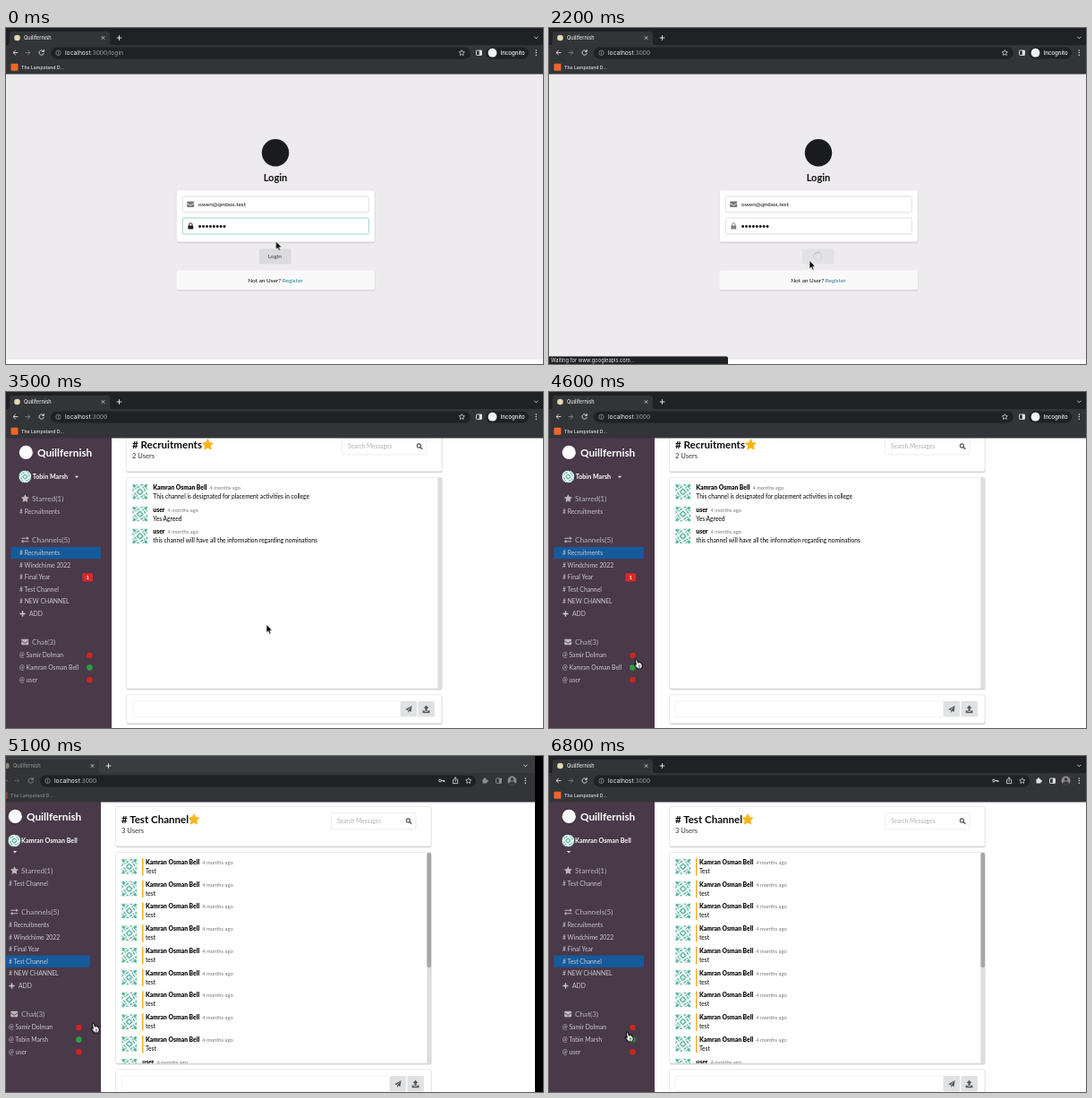
An HTML page that plays this animation: 600x375 px, repeating every 6900 ms.

```html
<!DOCTYPE html>
<html lang="en">
<head>
<meta charset="utf-8">
<title>Quillfernish</title>
<style>
html, body { margin: 0; width: 100%; height: 100%; overflow: hidden; background: #000; }
svg { display: block; width: 600px; height: 375px; font-family: Lato, sans-serif; }
text { white-space: pre; }
.ui { font-family: Inter, Roboto, sans-serif; }
.b { font-weight: 700; }
.h { font-weight: 900; }
.m { font-weight: 500; }
.line { fill: none; stroke-linecap: round; stroke-linejoin: round; }
.timed { animation: 6900ms step-end infinite; }
#first { animation: slide 6900ms step-end infinite; }
#second { animation: slide 6900ms step-end infinite; }
#pointer { animation: point 6900ms infinite steps(6); }
.spin { animation: spin 575ms linear infinite; transform-origin: 300.5px 255px; }
@keyframes spin { to { transform: rotate(360deg); } }
@keyframes slide {
  0% { transform: translateX(0); }
  68.115% { transform: translateX(62px); }
  69.565% { transform: translateX(257px); }
  71.014% { transform: translateX(462px); }
  72.463% { transform: translateX(574px); }
  73.913% { transform: translateX(622px); }
  75.362%, 100% { transform: translateX(634px); }
}
@keyframes point {
  0%, 1.449% { transform: translate(301.5px, 238px); }
  10.144%, 11.594% { transform: translate(300px, 251px); }
  20.289% { transform: translate(291px, 259.5px); }
  53.623% { transform: translate(291px, 259.5px); animation-timing-function: steps(4); }
  59.42%, 85.507% { transform: translate(97px, 298px); }
  94.202%, 100% { transform: translate(87px, 308px); }
}
</style>
</head>
<body>
<svg id="stage" viewBox="0 0 600 375" xmlns="http://www.w3.org/2000/svg"></svg>
<script>
const BRAND = 'Quillfernish';
const ME = 'Tobin Marsh';
const PEER = 'Kamran Osman Bell';
const THIRD = 'Samir Dolman';
const CHANNELS = ['Recruitments', 'Windchime 2022', 'Final Year', 'Test Channel', 'NEW CHANNEL'];
const LOOP = 6900;
const FOCUS = 5300; // the second window becomes active
let css = '';

// y is the middle of the capitals
const text = (x, y, s, size, fill = '#0d0d0d', cls = '', anchor = 'start') =>
  `<text x="${x}" y="${y + size * 0.36}" font-size="${size}" fill="${fill}" class="${cls}" text-anchor="${anchor}">${s}</text>`;
const rect = (x, y, w, h, fill, r = 0, extra = '') =>
  `<rect x="${x}" y="${y}" width="${w}" height="${h}" rx="${r}" fill="${fill}" ${extra}/>`;
const dot = (x, y, r, fill) => `<circle cx="${x}" cy="${y}" r="${r}" fill="${fill}"/>`;
const line = (d, color, w = 1) => `<path class="line" d="${d}" stroke="${color}" stroke-width="${w}"/>`;
const fill = (d, color) => `<path d="${d}" fill="${color}"/>`;
const at = (x, y, body) => `<g transform="translate(${x} ${y})">${body}</g>`;

// Visible only from a to b (ms)
function show(a, b, body) {
  const name = `on${a}to${b}`;
  const pct = t => Math.max(0, t / LOOP * 100 - 0.002) + '%';
  if (!css.includes(name)) {
    css += `@keyframes ${name}{0%{opacity:0}${pct(a)}{opacity:1}${b < LOOP ? pct(b) + '{opacity:0}' : ''}100%{opacity:${b < LOOP ? 0 : 1}}}`;
  }
  return `<g class="timed" style="animation-name:${name}">${body}</g>`;
}

function star(x, y, r, color, stroke = 'none', w = 0) {
  const pts = Array.from({ length: 10 }, (_, i) => {
    const a = i * Math.PI / 5, q = i % 2 ? r * 0.5 : r;
    return `${(x + q * Math.sin(a)).toFixed(2)},${(y - q * Math.cos(a)).toFixed(2)}`;
  });
  return `<polygon points="${pts.join(' ')}" fill="${color}" stroke="${stroke}" stroke-width="${w}" stroke-linejoin="round"/>`;
}

const mail = (x, y, c, bg) => at(x, y, rect(-4, -3.2, 8, 6.4, c, 0.8) + line('M-4 -1.2L0 1.4L4 -1.2', bg, 0.8));
const lock = (x, y, c) => at(x, y, rect(-2.9, -0.6, 5.8, 4, c, 0.6) + line('M-1.7 -.6V-1.8A1.7 1.7 0 0 1 1.7 -1.8V-.6', c, 1));
const lens = (x, y, c) => at(x, y, `<circle cx="-.6" cy="-.6" r="2.1" fill="none" stroke="${c}" stroke-width="1.1"/>` + line('M1.1 1.1L2.9 2.9', c, 1.3));
const swap = (x, y, c) => at(x, y, line('M-3.6 -1.6H3M-3 1.8H3.6', c, 1.1) +
  fill('M2 -3.6L4.4 -1.6L2 .4zM-2 -.2L-4.4 1.8L-2 3.8z', c));
const caret = (x, y, c) => fill(`M${x - 2} ${y - 1}h4l-2 2.2z`, c);
const avatar = (x, y, size) => `<use href="#tile" x="${x}" y="${y}" width="${size}" height="${size}"/>`;

const defs = `<defs>
  <symbol id="tile" viewBox="0 0 16 16">${rect(0, 0, 16, 16, '#f1f9f7')}${[0, 90, 180, 270].map(a =>
    `<path transform="rotate(${a} 8 8)" fill="#5fb5a2" d="M0 0h2l-2 2zM2 0l2 2-2 2-2-2zM4 0h2l-2 2zM6 2h2l-2 2h-2zM0 4l2 2-2 2zM2 4h2v2zM8 4l-4 4h2l2-2z"/>`).join('')}</symbol>
  <clipPath id="round"><circle cx="21.3" cy="94.5" r="7"/></clipPath>
  <clipPath id="list"><rect x="134" y="107" width="348" height="236"/></clipPath>
</defs>`;

function browser(guest) {
  const pale = '#dfe1e5', grey = '#9aa0a6';
  const strip = rect(0, 0, 603, 19, '#202124');
  const url = path => `<text class="ui" x="66" y="30" font-size="6.7" fill="#f1f3f4">localhost<tspan fill="${grey}">:3000${path}</tspan></text>`;
  const panel = (x, c) => `<rect x="${x - 3}" y="25" width="6" height="5.4" rx=".6" fill="none" stroke="${c}" stroke-width=".9"/>` + rect(x + 0.3, 25, 2.7, 5.4, c);
  const outline = x => star(x, 27.8, 3.2, 'none', pale, 0.75);
  // Parts that fade while the window is inactive
  const marks = line('M8.5 27.5h4.5M10.5 25.2L8 27.5L10.5 29.8', pale, 0.9) +
    line('M22 27.5h4.5M24.5 25.2L27 27.5L24.5 29.8', '#7d8085', 0.9) +
    line('M41.8 25.8A2.7 2.7 0 1 0 42.3 28.3M42.4 24.6v1.8h-1.8', pale, 0.9) +
    dot(12.5, 11, 3.3, '#e5d8b4') + text(20, 11, BRAND, 5.6, pale, 'ui m') +
    rect(5.5, 39.8, 8, 8, '#f0652a', 1) + text(17, 43.9, 'The Lampstand D...', 5.2, pale, 'ui m') +
    (guest ? panel(528.5, pale)
           : rect(544.5, 25.8, 4.8, 4.8, pale, 0.5) + dot(547, 25.5, 1.2, pale) + dot(549.7, 28, 1.2, pale) + panel(562.5, pale));
  const tools = guest
    ? outline(509.3) + rect(536, 21.5, 48, 13, '#202124', 6.5) + dot(543.5, 27.7, 4.9, '#f1f3f4') +
      text(552.5, 27.8, 'Incognito', 6.1, '#f1f3f4', 'ui m')
    : `<circle cx="497" cy="27.5" r="1.4" fill="none" stroke="${pale}" stroke-width=".9"/>` + line('M498.6 27.5h3.4v1.3m-1.3 -1.3v1', pale, 0.9) +
      line('M512.3 26.6h-.8v4h5.2v-4h-.8M514.1 28.6v-4.6m-1.4 1.3l1.4 -1.4l1.4 1.4', pale, 0.8) + outline(528.7) +
      dot(577.5, 27.5, 5, '#8c8c8c') + dot(577.5, 26, 1.8, '#393939') + fill('M573.7 30.7a4 3.4 0 0 1 7.6 0a5 5 0 0 1 -7.6 0z', '#393939');
  return rect(0, 0, 603, 51.5, '#333438') +
    (guest ? strip : rect(0, 0, 603, 19, '#3b3c40') + show(FOCUS, LOOP, strip)) +
    fill('M1 19q3 0 3 -3v-9q0 -3 3 -3h106q3 0 3 3v9q0 3 3 3z', '#333438') +
    rect(50, 21.5, guest ? 469 : 487, 13, '#202124', 6.5) +
    `<circle cx="58.5" cy="27.8" r="2.7" fill="none" stroke="${grey}" stroke-width=".7"/>` +
    line('M58.5 27.6v1.5M58.5 26.4v.1', grey, 0.7) +
    line('M107 9.5l3 3m0 -3l-3 3', pale, 0.8) + line('M126.5 8.6v4.8m-2.4 -2.4h4.8', pale, 1) +
    (guest ? marks + show(0, 1600, url('/login')) + show(1600, LOOP, url(''))
           : url('') + show(0, FOCUS, `<g opacity=".5">${marks}</g>`) + show(FOCUS, LOOP, marks)) +
    tools + [25, 27.6, 30.2].map(y => dot(592.3, y, 0.75, pale)).join('') + line('M590.5 10l1.8 1.8l1.8 -1.8', pale, 0.9);
}

function card(x, y, w, h) {
  return rect(x + 0.4, y + 0.8, w, h + 0.7, '#d5d4d6', 1.8) + rect(x, y, w, h, '#fff', 1.8, 'stroke="#dcdcde" stroke-width=".6"');
}

function login() {
  const field = (y, focus) => rect(197.3, y, 208, 18, '#fff', 1.8, `stroke="${focus ? '#85c4cd' : '#d9d9db'}" stroke-width=".8"`);
  const dots = Array.from({ length: 8 }, (_, i) => dot(216.6 + i * 3.92, 221.5, 1.45, '#111')).join('');
  const pass = focus => field(212, focus) + lock(206.3, 221.2, focus ? '#222' : '#808080');
  const button = c => rect(283, 246.5, 35.5, 17, c, 1.8) + text(300.3, 255, 'Login', 6.5, '#444', '', 'middle');
  const idle = '#dbdadc', hover = '#cacbcd';
  return rect(0, 51, 603, 319.5, '#edebed') + rect(0, 370.5, 603, 5, '#fff') +
    dot(301, 139.3, 15.2, '#1b1c1d') + text(301, 167.3, 'Login', 11.1, '#111', 'b', 'middle') +
    card(190.3, 180.8, 221.7, 58) + field(187.8) + mail(206.2, 196.8, '#777', '#fff') +
    text(215, 196.8, 'owen@qmbox.test', 6.5) +
    show(0, 900, pass(true)) + show(900, LOOP, pass(false)) + dots +
    show(0, 600, button(idle)) + show(600, 1000, button(hover)) +
    show(1000, LOOP, rect(283, 246.5, 35.5, 17, '#e2e1e3', 1.8) +
      `<circle cx="300.5" cy="255" r="4.6" fill="none" stroke="#d6d5d7" stroke-width="1"/><g class="spin">${line('M300.5 250.4a4.6 4.6 0 0 1 4.6 4.6', '#b5b4b6', 1)}</g>`) +
    card(190.3, 270.3, 221.7, 21.8) + rect(190.6, 270.6, 221, 21.2, '#f9f9fa', 1.6) +
    `<text x="301" y="283.7" font-size="6.45" text-anchor="middle" fill="#0d0d0d">Not an User? <tspan fill="#22808f">Register</tspan></text>` +
    show(2200, LOOP, fill('M0 366.5h198q2 0 2 2v7h-200z', '#202124') +
      text(2, 371.3, 'Waiting for www.googleapis.com...', 5.7, '#e8eaed', 'ui'));
}

function sidebar({ name, photo = true, dy = 0, starred, active, badge, chats }) {
  const soft = '#bdb5bd', item = '#cdc7cd', bg = '#493949';
  let y = 119 + dy;
  let out = rect(0, 51, 118, 324, bg) + dot(22.3, 67.4, 7.6, '#fff') + text(35, 67.5, BRAND, 11.8, '#fff', 'b') +
    (photo ? `<g clip-path="url(#round)">${avatar(14.3, 87.5, 14)}</g>` : '') +
    text(dy ? 29 : 29.8, 94.6, name, 7.15, '#fff', 'b') + (dy ? caret(22, 107, '#fff') : caret(79, 94.8, '#fff'));
  out += star(21.4, y, 4.8, soft) + text(29, y, `Starred(${starred ? 1 : 0})`, 8.25, soft);
  if (starred) {
    out += text(15, y + 14.4, '# ' + starred, 6.8, item);
    y += 13.7;
  }
  out += swap(21.3, y + 32.2, soft) + text(29, y + 32.2, 'Channels(5)', 8.25, soft);
  CHANNELS.forEach((c, i) => {
    const cy = y + 47 + i * 13.55;
    if (c === active) out += rect(5.5, cy - 6.8, 100.5, 13.4, '#155a9b');
    out += text(15, cy, '# ' + c, 6.8, item);
    if (badge && i === 2) out += rect(85.5, cy - 4.6, 11.6, 9.4, '#db2828', 1.4) + text(91.3, cy, '1', 5.8, '#fff', 'b', 'middle');
  });
  out += line(`M16 ${y + 114.7}h5m-2.5 -2.5v5`, item, 1.5) + text(26, y + 114.7, 'ADD', 6.8, item);
  out += mail(21.2, y + 146.3, soft, bg) + text(29, y + 146.3, `Chat(${chats ? 3 : -1})`, 8.25, soft);
  (chats || []).forEach((c, i) => {
    const cy = y + 161.3 + i * 13.6;
    out += text(15, cy, '@ ' + c, 6.8, item) + dot(93.4, cy, 3.3, i === 1 ? '#2aa146' : '#cf2420');
  });
  return out;
}

function message(i, [who, words], own) {
  const y = 118.6 + i * 24.75, mine = own && who === PEER, x = mine ? 168 : 164.3;
  return avatar(141.3, y - 3.6, 16.8) + (mine ? rect(164, y - 4.6, 1.5, 19.4, '#f0ae2c') : '') +
    `<text x="${x}" y="${y + 2.3}" font-size="6.75" class="h" fill="#0d0d0d">${who}<tspan dx="3" font-size="5.8" font-weight="400" fill="#777">4 months ago</tspan></text>` +
    text(x, y + 9.8, words, 6.65, '#000');
}

function board({ title, users, starX, gold, list = [], own }) {
  const grey = '#e0e1e2', ink = '#555';
  return rect(118, 51, 485, 345, '#fff') +
    card(134.5, 56.5, 352.5, 44.3) + text(141, 71, '# ' + title, 11.55, '#0d0d0d', 'b') +
    (gold ? star(starX, 71, 6.4, '#f9b312', '#f9b312', 0.6) : star(starX, 71.2, 5.7, 'none', '#222', 1.2)) +
    text(141, 83, `${users} Users`, 7.6, '#333', users ? '' : 'm') +
    rect(375.4, 63.6, 94.6, 18.3, '#fff', 1.8, 'stroke="#e6e6e6" stroke-width=".7"') +
    text(382, 72.7, 'Search Messages', 6.6, '#b0b0b0') + lens(462, 72.6, '#555') +
    card(134.5, 107.5, 352.5, 235.5) + rect(482.3, 107.8, 4.7, 235, '#dddddf') +
    (own ? rect(482.4, 108, 4.6, 128, '#a6a6a8', 2) : '') +
    `<g clip-path="url(#list)">${list.map((m, i) => message(i, m, own)).join('')}</g>` +
    card(134.5, 349.8, 352.5, 32) + rect(141.3, 357, 299.5, 17.4, '#fff', 1.8, 'stroke="#ebebeb" stroke-width=".7"') +
    rect(440.8, 357, 18.3, 17.4, grey, 1.5) + rect(460.4, 357, 18.5, 17.4, grey, 1.5) +
    fill('M453.6 362l-7.4 4.2l2.2 1zM453.6 362l-4.4 5.4v2.6l1.3 -1.9l2 .8z', ink) +
    fill('M469.5 361.8l3 3.2h-1.9v3h-2.2v-3h-1.9zM465.6 367.6h2v1.2h3.8v-1.2h2v2.6h-7.8z', ink);
}

function firstWindow() {
  const side = { name: ME, active: CHANNELS[0] };
  const full = { ...side, badge: true, chats: [THIRD, PEER, 'user'] };
  const page = { title: CHANNELS[0], starX: 225.4 };
  const loaded = {
    ...page, users: 2,
    list: [
      [PEER, 'This channel is designated for placement activities in college'],
      ['user', 'Yes Agreed'],
      ['user', 'this channel will have all the information regarding nominations'],
    ],
  };
  const app = (s, p) => at(0, -12, board(p)) + sidebar(s);
  return rect(0, 0, 600, 375, '#fff') + show(0, 2400, login()) +
    show(2400, 2900, app({ ...side, photo: false }, { ...page, users: 0 })) +
    show(2900, 3500, app(full, loaded)) +
    show(3500, LOOP, app({ ...full, starred: CHANNELS[0] }, { ...loaded, gold: true })) +
    show(2400, 3100, rect(597.2, 64, 2.8, 311, '#8c8c8e', 1.4)) + browser(true);
}

function secondWindow() {
  const words = i => i % 8 ? 'test' : 'Test';
  const list = Array.from({ length: 9 }, (_, i) => [PEER, words(i)]).concat([['user', 'test']]);
  return board({ title: CHANNELS[3], users: 3, starX: 222, gold: true, own: true, list }) +
    sidebar({ name: PEER, dy: 9, starred: CHANNELS[3], active: CHANNELS[3], chats: [THIRD, ME, 'user'] }) + browser(false);
}

const arrow = `<path d="M0 0v9.3l2.1 -1.9l1.5 3.3l1.6 -.7l-1.5 -3.2h3z" fill="#000" stroke="#fff" stroke-width=".7" stroke-linejoin="round"/>`;
const hand = `<g transform="translate(-.8 -.6) scale(1.12)"><path d="M.2 1.1q.8 -1 1.6 .1l1.2 3l.3 -.7q.9 -.4 1.2 .6q.8 -.5 1.2 .5q.9 -.2 1.1 .8l.3 2.1q0 1.3 -.8 2.6h-4l-3.2 -3.6q-.2 -1.2 1 -.8l.9 .5z" fill="#fff" stroke="#000" stroke-width=".9" stroke-linejoin="round"/>${line('M3.6 6.6v1.8m1.3 -1.8v1.8', '#000', 0.5)}</g>`;

const stage = document.getElementById('stage');
const art = defs +
  `<g id="first">${firstWindow()}</g>` +
  `<g id="second">${show(4600, LOOP, at(-634, 0, secondWindow()))}</g>` +
  `<g id="pointer">${show(0, 600, arrow)}${show(600, 1000, hand)}${show(1000, 4000, arrow)}${show(4000, LOOP, hand)}</g>`;
document.head.appendChild(document.createElement('style')).textContent = css;
stage.innerHTML = art;
</script>
</body>
</html>
```
